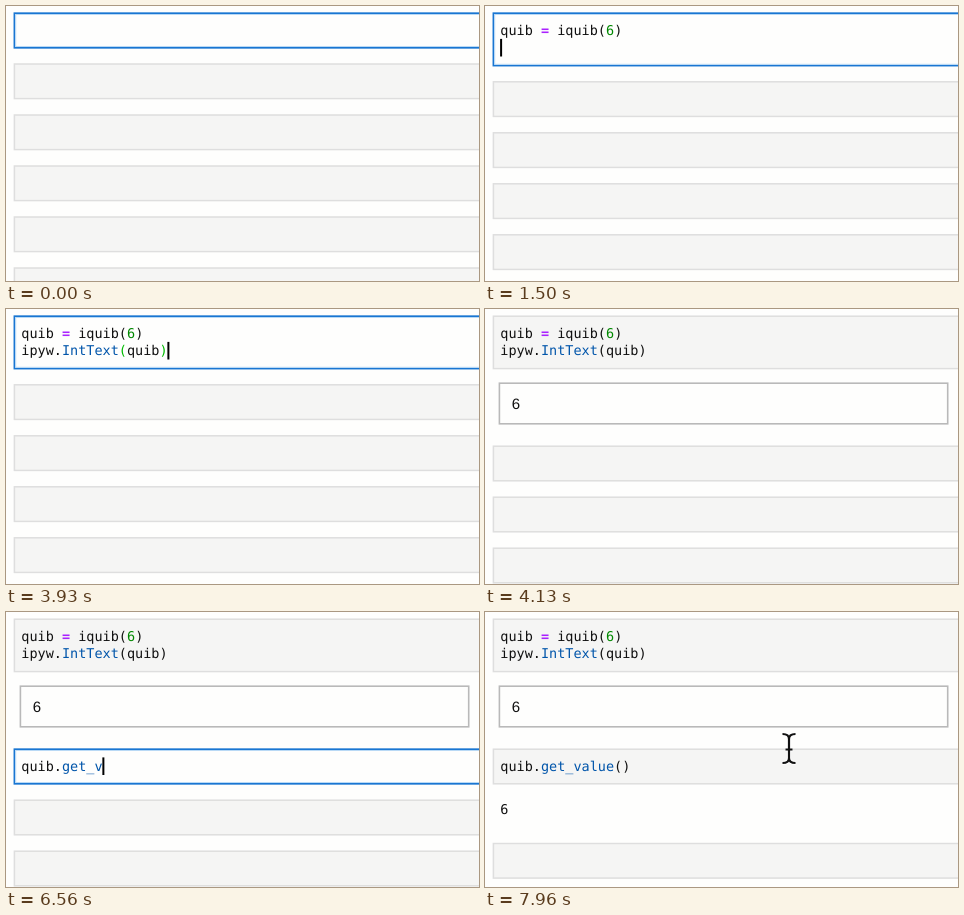
An HTML page that plays this animation: 473x275 px, repeating every 8 s.

```html
<!DOCTYPE html>
<html lang="en">
<head>
<meta charset="utf-8">
<title>Notebook typing</title>
<style>
  html, body { margin: 0; width: 100%; height: 100%; overflow: hidden; background: #fefefd; }
  svg { display: block; width: 473px; height: 275px; }
  text { font: 13.5px "DejaVu Sans Mono", monospace; white-space: pre; text-rendering: geometricPrecision; fill: #111; }
  .op { fill: #a2f; font-weight: bold; }
  .num { fill: #080; }
  .prop { fill: #05a; }
  .match { fill: #0b0; }
  .field { font: 15px "Liberation Sans", Arial, sans-serif; }
  .cell { fill: #f5f5f4; stroke: #dedede; stroke-width: 1.5; }
  .cell.edit { fill: #fefefd; stroke: #1976d2; stroke-width: 1.7; }
  .glow { fill: none; stroke: #b9d9f5; stroke-width: 1; }
  .box { fill: #fefefd; stroke: #b9b9b9; stroke-width: 1.6; }
</style>
</head>
<body>
<svg id="stage" viewBox="0 0 473 275"></svg>
<script>
const LOOP = 8000, LEFT = 15.3, CHAR = 8.127, PITCH = 51;
const ONE = 34.6, TWO = 52.4;          // cell heights for one and two lines
const LINE_TOP = [15.3, 32.9, 145.4];

// line, first key, last key, typed text
const KEYS = [
  [0, 130, 500, "quib = "], [0, 660, 830, "iquib"], [0, 1060, 1130, "(6"], [0, 1300, 1300, ")"],
  [1, 1730, 1930, "ip"], [1, 2130, 2130, "y"], [1, 2300, 2300, "w"], [1, 2460, 2460, "."],
  [1, 2700, 2900, "Int"], [1, 3100, 3330, "Text"], [1, 3500, 3760, "(quib"], [1, 3930, 3930, ")"],
  [2, 5430, 5700, "quib"], [2, 5900, 5900, "."], [2, 6100, 6200, "get"], [2, 6400, 6400, "_"],
  [2, 6560, 6800, "value"], [2, 7000, 7100, "()"]
];

function typed(line, t) {
  let out = "";
  for (const [row, from, to, text] of KEYS) {
    if (row !== line || t < from) continue;
    const gap = (to - from) / Math.max(1, text.length - 1);
    const count = gap ? Math.floor((t - from) / gap + 1e-6) + 1 : text.length;
    out += text.slice(0, count);
  }
  return out;
}

const span = (cls, s) => `<tspan class="${cls}">${s}</tspan>`;

function highlight(code, matched) {
  return code.replace(/=|\d|[()]|\.\w+/g, s => {
    if (s === "=") return span("op", s);
    if (/\d/.test(s)) return span("num", s);
    if (s[0] === ".") return "." + span("prop", s.slice(1));
    return matched ? span("match", s) : s;
  });
}

const label = (x, y, body, cls = "") => `<text x="${x}" y="${y}" class="${cls}">${body}</text>`;
const rect = (x, y, w, h, cls) => `<rect x="${x}" y="${y}" width="${w}" height="${h}" class="${cls}"/>`;

function cell(y, h, edit) {
  return rect(8.4, y, 490, h, edit ? "cell edit" : "cell") +
    (edit ? rect(9.7, y + 1.3, 490, h - 2.6, "glow") : "");
}

function emptyCells(y) {
  let out = "";
  for (; y < 275; y += PITCH) out += cell(y, ONE, false);
  return out;
}

function codeLine(line, t, active) {
  const code = typed(line, t), top = LINE_TOP[line];
  const matched = active && code.endsWith(")");
  const caret = active && t >= 130
    ? `<rect x="${LEFT + code.length * CHAR - 0.2}" y="${top}" width="2" height="17.6"/>` : "";
  return label(LEFT, top + 13.4, highlight(code, matched)) + caret;
}

function pointer(x, y) {
  const d = "M-6.5-14.5Q0-14.5 0-9.5Q0-14.5 6.5-14.5M0-10V10M-6.5 14.5Q0 14.5 0 9.5Q0 14.5 6.5 14.5M-3.5 1H3.5";
  const stroke = (color, w) => `<path d="${d}" fill="none" stroke="${color}" stroke-width="${w}"/>`;
  return `<g transform="translate(${x} ${y})">${stroke("#fff", 4)}${stroke("#111", 2.2)}</g>`;
}

function scene(t) {
  const twoLines = t >= 1500, ran = t >= 4130;
  const editTop = t < 4100, editNext = t >= 5230 && t < 7300;
  let out = cell(7.2, twoLines ? TWO : ONE, editTop);
  out += codeLine(0, t, !twoLines);
  if (twoLines) out += codeLine(1, t, editTop);
  if (!ran) return out + emptyCells(twoLines ? 75.8 : 58);

  out += rect(14.4, 74.2, 448.3, 40.6, "box") + label(26.7, 100, "6", "field");
  out += cell(137.2, ONE, editNext) + codeLine(2, t, editNext);
  if (t >= 7400) out += label(LEFT, 202.3, "6") + emptyCells(231.5);
  else out += emptyCells(188.2);
  if (t >= 7930) out += t < 7960 ? pointer(419, 143) : pointer(304, 136.5);
  return out;
}

const stage = document.getElementById("stage");
const start = performance.now();
let shown = "";

function draw(now) {
  const next = scene(Math.max(0, now - start) % LOOP);
  if (next !== shown) stage.innerHTML = shown = next;
  requestAnimationFrame(draw);
}
draw(start);
</script>
</body>
</html>
```
